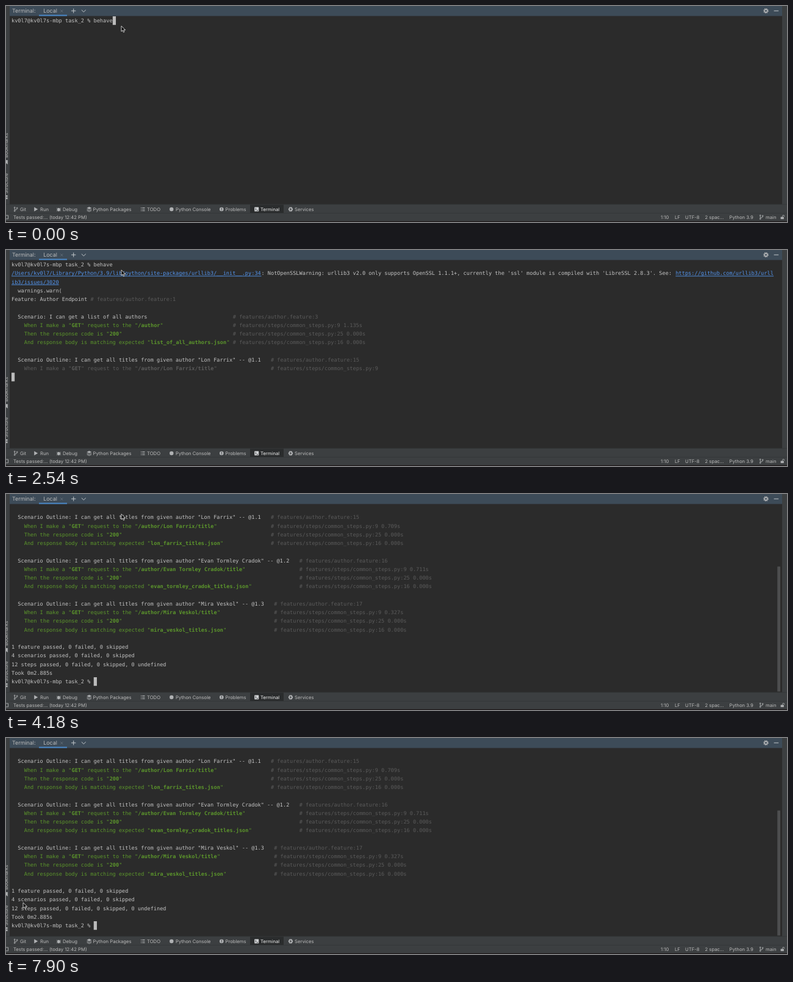
These frames come from a looping animation (1280 by 356 pixels, 8000 ms). An HTML page:

```html
<!DOCTYPE html>
<html lang="en">
<head>
<meta charset="utf-8">
<title>Terminal test run</title>
<style>
  html, body { margin: 0; width: 100%; height: 100%; overflow: hidden; background: #2b2b2b; }
  svg { display: block; width: 100%; height: 100%; }
  text { white-space: pre; text-rendering: geometricPrecision; }
  #screen { font: 8.61px "DejaVu Sans Mono", "Noto Sans Mono", monospace; fill: #c3c3c3; }
  #screen .dim { fill: #5b5b5b; }
  #screen .ok { fill: #5c962c; }
  #screen .b { font-weight: 700; }
  #screen .link { fill: #5394ec; }
  .ui { font: 7.7px Inter, Roboto, sans-serif; fill: #bbbbbb; }
  .head { font-size: 8.9px; }
  .line { fill: none; stroke: #afb1b3; stroke-width: 1; }
  .icon { fill: #afb1b3; }
</style>
</head>
<body>
<svg viewBox="0 0 1280 356">
  <rect width="1280" height="356" fill="#3c3f41"/>
  <rect x="6" y="16" width="1266" height="311" fill="#2b2b2b"/>
  <rect x="6" width="1266" height="16.5" fill="#3d4b58"/>
  <rect x="54" y="14.5" width="46" height="2" fill="#4a88c7"/>
  <rect y="326.6" width="1280" height=".8" fill="#333537"/>
  <rect y="341" width="1280" height=".8" fill="#333537"/>
  <rect y="354.8" width="1280" height="1.2" fill="#1c1718"/>
  <rect x="400" y="327.5" width="55" height="13.5" fill="#2a2c2d"/>

  <g class="line">
    <path d="M89.3 6.3l4 4m0-4l-4 4" stroke="#6d7882" stroke-width=".8"/>
    <path d="M107 8h7.4M110.7 4.3v7.4M123.8 6.5l3.5 3.3 3.5-3.3M1258.6 8h7.6" stroke="#c3c8cc"/>
    <circle cx="1245.5" cy="8" r="2.3" stroke-width="1.7"/>
    <circle cx="1245.5" cy="8" r="3.7" stroke-width="1.2" stroke-dasharray="1.6 1.3"/>
  </g>

  <g id="labels" class="ui"></g>

  <g class="icon">
    <path d="M0 254h2.8v7L0 259z"/>
    <path d="M0 312h2.6v2.4H0zM0 315.6h2.6v2.6H0z"/>
    <path d="M46.2 331.4l6 3.6-6 3.6z"/>
    <ellipse cx="86.4" cy="335.6" rx="2" ry="2.9"/>
    <path d="M132.4 333l4-2 4 2-4 2z"/>
    <circle cx="271.3" cy="335" r="3.2"/>
    <circle cx="353.3" cy="335" r="3.3"/>
    <rect x="407.2" y="331.6" width="7" height="6.8" rx=".6" fill="#d0d2d4"/>
    <path d="M464.6 331.6h3.8l2 3.4-2 3.4h-3.8l-2-3.4z"/>
    <rect x="1269.6" y="347.6" width="5.2" height="3.6"/>
  </g>
  <g class="line">
    <path d="M83 333l7 5M90 333l-7 5M83 335.6h7" stroke-width=".8"/>
    <path d="M132.6 335l3.8 1.9 3.8-1.9M132.6 337l3.8 1.9 3.8-1.9" stroke-width=".9"/>
    <path d="M221 332.5h1.2M223.2 332.5h4.4M221 335h1.2M223.2 335h4.4M221 337.5h1.2M223.2 337.5h4.4"/>
    <path d="M353.3 332.8v2.8M353.3 336.3v1" stroke="#3c3f41"/>
    <path d="M408.4 333.2l1.7 1.6-1.7 1.6M410.8 336.9h2.2" stroke="#2a2c2d" stroke-width=".9"/>
    <path d="M465.8 333.6l2 1.4-2 1.4z" stroke="#3c3f41"/>
    <path d="M-3 345.2h6.6v5.6h-6.6" stroke-width=".9"/>
    <path d="M1272.6 347.6v-1.2a1.5 1.5 0 0 1 3 0v.8" stroke-width=".9"/>
    <g id="branches" stroke-width=".9"></g>
  </g>

  <g id="screen"></g>
  <rect id="caret" width="5.2" height="14.2" fill="#bbbbbb"/>
  <rect id="thumb" x="1264.2" width="4.8" rx=".6" fill="#4d4e4f"/>
  <path id="pointer" d="M.5 .7V9.8L2.6 7.9 4 11.1 5.6 10.4 4.2 7.3H7.2z" fill="#111" stroke="#f2f2f2" stroke-width=".8"/>
</svg>
<script>
const LOOP = 8000, LEFT = 9, TOP = 17, CELL = 5.183, ROW = 14.25;
const $ = id => document.getElementById(id);

// Window labels: x, baseline, text
const label = (x, y, s, attrs = '') => `<text x="${x}" y="${y}" ${attrs}>${s}</text>`;
const rowOf = (y, items) => items.map(([x, s]) => label(x, y, s)).join('');
const side = (y, s) => label(0, 0, s, `transform="translate(3.2 ${y}) rotate(-90)"`);
$('labels').innerHTML =
  label(10, 11.3, 'Terminal:', 'class="head"') + label(61.2, 11.3, 'Local', 'class="head"') +
  rowOf(338, [[23, 'Git'], [56, 'Run'], [93, 'Debug'], [142.5, 'Python Packages'], [231, 'TODO'],
    [278, 'Python Console'], [359.5, 'Problems'], [473, 'Services']]) +
  label(417, 338, 'Terminal', 'fill="#f0f0f0"') +
  rowOf(351, [[12, 'Tests passed:... (today 12:42 PM)'], [1073, '1:10'], [1096, 'LF'], [1113, 'UTF-8'],
    [1145.5, '2 spac...'], [1185.5, 'Python 3.9'], [1245, 'main']]) +
  side(250, 'Bookmarks') + side(309, 'Structure');
$('branches').innerHTML = [[14.2, 335], [1236.2, 348]].map(([x, y]) =>
  `<g transform="translate(${x} ${y})"><path d="M0 -2V2M0 1.2Q4 1.2 4 -1"/>` +
  [[0, -2.8], [0, 2.8], [4, -2]].map(([a, b]) => `<circle cx="${a}" cy="${b}" r=".9"/>`).join('') + '</g>').join('');

// A terminal line is a function of "pending" giving [column, text, class] parts
const line = (...parts) => () => parts;
const plain = s => line([0, s, '']);
const blank = line();

function step(text, col, loc, time) {
  return pending => {
    let at = 4;
    const parts = text.split('*').map((s, i) => {
      const part = [at, s, (pending ? 'dim' : 'ok') + (i % 2 ? ' b' : '')];
      at += s.length;
      return part;
    });
    const tail = pending ? '' : ' ' + time;
    return [...parts, [col, `# features/steps/common_steps.py:${loc}${tail}`, 'dim']];
  };
}

function scenario(title, col, loc, path, time, file) {
  return [
    line([2, title, ''], [col, '# features/author.feature:' + loc, 'dim']),
    step(`When I make a "*GET*" request to the "*${path}*"`, col, 9, time),
    step('Then the response code is "*200*"', col, 25, '0.000s'),
    step(`And response body is matching expected "*${file}*"`, col, 16, '0.000s'),
    blank
  ];
}

function outline(name, n, time) {
  const title = `Scenario Outline: I can get all titles from given author "${name}" -- @1.${n}`;
  const file = name.toLowerCase().replace(/ /g, '_') + '_titles.json';
  return scenario(title, title.length + 5, 14 + n, `/author/${name}/title`, time, file);
}

const PROMPT = 'kv0l7@kv0l7s-mbp task_2 % ';
const lines = [
  plain(PROMPT + 'behave'),
  line([0, '/Users/kv0l7/Library/Python/3.9/lib/python/site-packages/urllib3/__init__.py:34', 'link'],
    [79, ": NotOpenSSLWarning: urllib3 v2.0 only supports OpenSSL 1.1.1+, currently the 'ssl' module is compiled with 'LibreSSL 2.8.3'. See: ", ''],
    [210, 'https://github.com/urllib3/urll', 'link']),
  line([0, 'ib3/issues/3020', 'link']),
  plain('  warnings.warn('),
  line([0, 'Feature: Author Endpoint', ''], [25, '# features/author.feature:1', 'dim']),
  blank,
  ...scenario('Scenario: I can get a list of all authors', 70, 3, '/author', '1.135s', 'list_of_all_authors.json'),
  ...outline('Lon Farrix', 1, '0.709s'),
  ...outline('Evan Tormley Cradok', 2, '0.711s'),
  ...outline('Mira Veskol', 3, '0.327s'),
  plain('1 feature passed, 0 failed, 0 skipped'),
  plain('4 scenarios passed, 0 failed, 0 skipped'),
  plain('12 steps passed, 0 failed, 0 skipped, 0 undefined'),
  plain('Took 0m2.885s'),
  plain(PROMPT)
];

// time, lines printed, first visible line, last line pending, scrollbar top
const views = [
  [0, 1, 0, false], [1350, 8, 0, true], [2540, 13, 0, true], [3140, 18, 0, true],
  [3880, 23, 3, true, 57.5], [4180, 31, 10, false, 119.5]
];
// time, row, column (none: hidden)
const carets = [
  [0, 0, 32], [1050], [1200, 1, 0], [1350, 8, 0], [2390], [2540, 13, 0], [3140, 18, 0], [3730],
  [3880, 20, 0], [4180, 20, 26], [5230], [5830, 20, 26], [6280], [6720, 20, 26], [7310], [7750, 20, 26]
];
// time, x, y
const pointers = [
  [0, 188.5, 32.2], [6570, 164.2, 131], [6720, 145, 229.2], [6860, 64.2, 276.4], [7010, 6.4, 278.2],
  [7160, -20, 278], [7310, -3, 275], [7450, 1, 271.2], [7750, 10.3, 271.5], [7900, 27.5, 270.6]
];

const current = (list, t) => list.filter(e => e[0] <= t).pop();
const show = (el, on) => el.setAttribute('visibility', on ? 'visible' : 'hidden');

function drawPart([col, s, cls], row) {
  const x = LEFT + col * CELL, y = TOP + row * ROW + 10;
  const rule = cls === 'link'
    ? `<rect class="link" x="${x}" y="${y + 1.3}" width="${s.length * CELL}" height=".9"/>` : '';
  return label(x, y, s, `class="${cls}"`) + rule;
}

let shown;
function drawView(view) {
  if (view === shown) return;
  shown = view;
  const [, count, first, pending, bar] = view;
  $('screen').innerHTML = lines.slice(first, count).map((get, row) =>
    get(pending && first + row === count - 1).map(p => drawPart(p, row)).join('')).join('');
  show($('thumb'), bar);
  if (bar) {
    $('thumb').setAttribute('y', bar);
    $('thumb').setAttribute('height', 325.5 - bar);
  }
}

function render(t) {
  drawView(current(views, t));
  const [, row, col] = current(carets, t);
  show($('caret'), col !== undefined);
  if (col !== undefined) {
    $('caret').setAttribute('x', LEFT + col * CELL);
    $('caret').setAttribute('y', TOP + row * ROW);
  }
  const [, x, y] = current(pointers, t);
  $('pointer').setAttribute('transform', `translate(${x} ${y})`);
}

const start = performance.now();
function tick() {
  render((performance.now() - start) % LOOP);
  requestAnimationFrame(tick);
}
tick();
</script>
</body>
</html>
```
